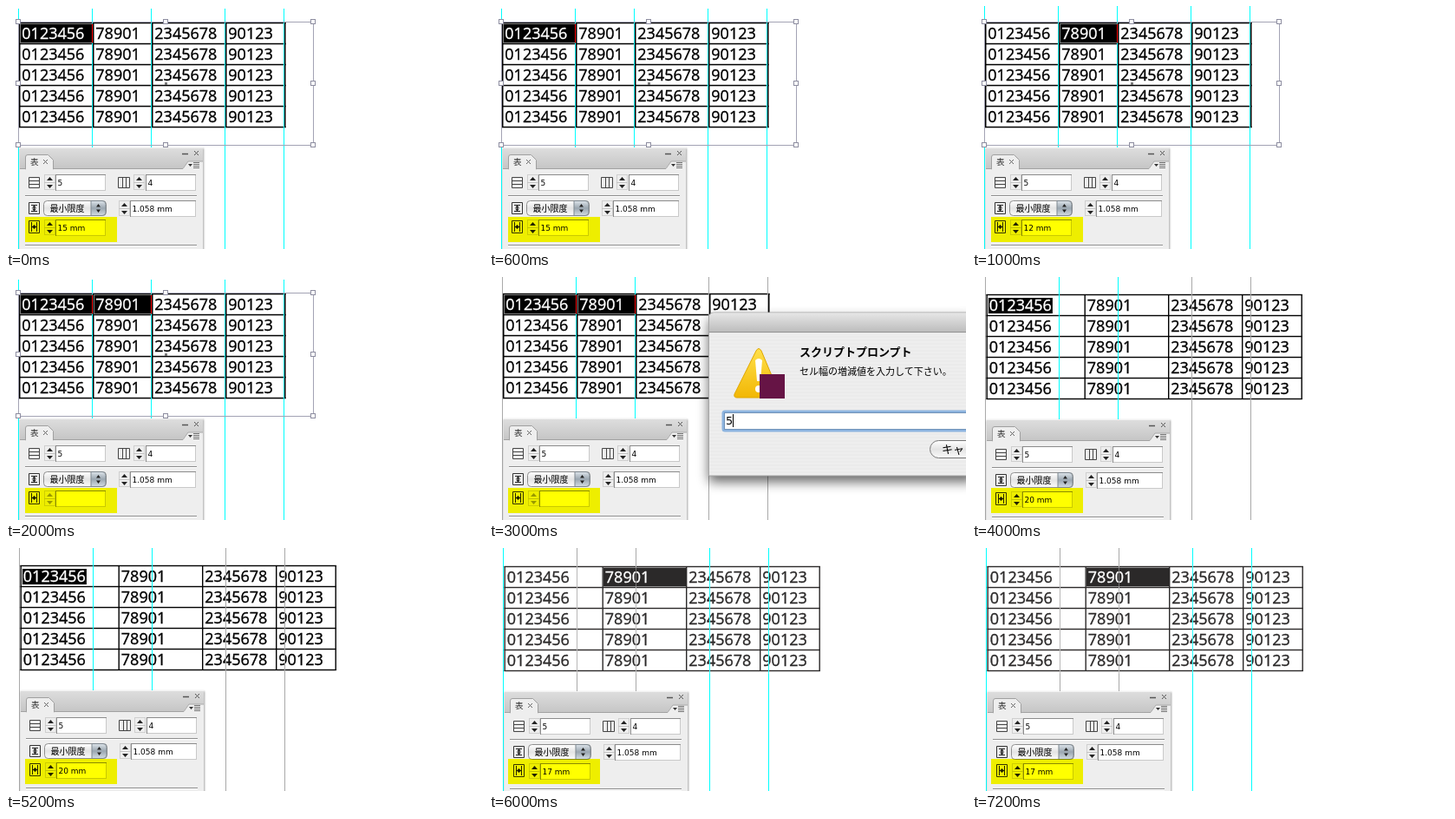
Recreate the animation shown at these times as an HTML page. Size 550 px wide and 280 px high, loop 8 s.

```html
<!DOCTYPE html>
<html lang="ja">
<head>
<meta charset="utf-8">
<title>Table cell width</title>
<style>
html, body { margin: 0; width: 100%; height: 100%; overflow: hidden; background: #fff; }
svg { display: block; width: 550px; height: 280px; }
text { white-space: pre; }
.cell { font: 18px "Open Sans", "Noto Sans", sans-serif; stroke: #000; stroke-width: .35px; }
.ui { font: 9px "DejaVu Sans", sans-serif; }
.jp { font-family: "Noto Sans CJK JP", "Noto Sans CJK", sans-serif; }
.invert { mix-blend-mode: difference; }
.fade { mix-blend-mode: screen; }
.marker { mix-blend-mode: multiply; }
</style>
</head>
<body>
<svg viewBox="0 0 550 280" xmlns="http://www.w3.org/2000/svg">
  <defs>
    <linearGradient id="bar" x2="0" y2="1">
      <stop stop-color="#dedede"/><stop offset="1" stop-color="#c6c6c6"/>
    </linearGradient>
    <linearGradient id="title" x2="0" y2="1">
      <stop stop-color="#e6e6e6"/><stop offset="1" stop-color="#bdbdbd"/>
    </linearGradient>
    <linearGradient id="button" x2="0" y2="1">
      <stop stop-color="#fff"/><stop offset=".5" stop-color="#e4e4e4"/><stop offset="1" stop-color="#fafafa"/>
    </linearGradient>
    <linearGradient id="knob" x2="0" y2="1">
      <stop stop-color="#dde4ea"/><stop offset=".5" stop-color="#9aa6b0"/><stop offset="1" stop-color="#d3dce3"/>
    </linearGradient>
    <linearGradient id="warn" x2="0" y2="1">
      <stop stop-color="#ffe04a"/><stop offset="1" stop-color="#f2b705"/>
    </linearGradient>
    <filter id="soft" x="-20%" y="-20%" width="140%" height="140%"><feGaussianBlur stdDeviation="7"/></filter>
    <filter id="near" x="-5%" y="-5%" width="110%" height="110%"><feGaussianBlur stdDeviation="1"/></filter>
  </defs>
  <g id="stage"></g>
</svg>
<script>
const stage = document.getElementById('stage');
const LABELS = ['0123456', '78901', '2345678', '90123'];
const GUIDES = [14, 99, 167, 252, 320];
const NARROW = [15, 100, 168, 253, 321];
const WIDE = [15.5, 128.5, 225, 310, 378.5];
const ROW = 24, TOP = 19, LOOP = 8000;

// cyan: indices of highlighted guides; sel: selected columns of the first row
const before = { dx: 0, dy: 0, cols: NARROW, cyan: [0, 1, 2, 3, 4], guideTop: 3, frame: true, weight: 1.5 };
const after = { dx: 1, dy: 1, cols: WIDE, cyan: [1, 2], guideTop: -3, weight: 1.4 };
const STEPS = [
  { ...before, until: 1000, sel: [0], width: '15 mm' },
  { ...before, until: 2000, sel: [1], width: '12 mm', guideTop: 0 },
  { ...before, until: 3000, sel: [0, 1], width: '' },
  { ...before, until: 4000, dx: 1, cyan: [1, 2], guideTop: 0, frame: false, sel: [0, 1], width: '', dialog: true },
  { ...after, until: 6000, sel: [0], textOnly: true, width: '20 mm' },
  { ...after, until: LOOP, dx: 2, dy: 2, cyan: [0, 3, 4], sel: [1], faded: true, width: '17 mm' }
];

const rect = (x, y, w, h, fill, more = '') =>
  `<rect x="${x}" y="${y}" width="${w}" height="${h}" fill="${fill}" ${more}/>`;
const box = (x, y, w, h, fill, stroke, more = '') =>
  rect(x + .5, y + .5, w - 1, h - 1, fill, `stroke="${stroke}" ${more}`);
const path = (d, fill, more = '') => `<path d="${d}" fill="${fill}" ${more}/>`;
const line = (d, color = '#222', w = 1) => path(d, 'none', `stroke="${color}" stroke-width="${w}"`);
const text = (x, y, s, cls, more = '') => `<text x="${x}" y="${y}" class="${cls}" ${more}>${s}</text>`;
const move = (x, y, s) => `<g transform="translate(${x} ${y})">${s}</g>`;

function table({ cols, weight }) {
  const left = cols[0], span = cols[4] - left + weight;
  let out = '';
  for (let r = 0; r < 5; r++)
    LABELS.forEach((s, c) => out += text(cols[c] + 3.3, TOP + 19 + r * ROW, s, 'cell'));
  for (let r = 0; r <= 5; r++)
    out += rect(left, TOP + r * ROW - .2, span, weight, '#000');
  for (const x of cols) out += rect(x, TOP, weight, ROW * 5 + 1, '#000');
  return out;
}

function guides({ cyan, guideTop }) {
  return GUIDES.map((x, i) =>
    rect(x, guideTop, 1, 290, cyan.includes(i) ? '#0ff' : '#a9a9a9')).join('');
}

function selection({ cols, sel, textOnly, weight }) {
  return sel.map(c => {
    const x = cols[c] + weight;
    return textOnly
      ? rect(x + 1, TOP + 4, 74, 18, '#fff', 'class="invert"')
      : rect(x, TOP + 1.5, cols[c + 1] - x, ROW - 2, '#fff', 'class="invert"');
  }).join('');
}

function frame() {
  const xs = [14, 184, 354], ys = [18, 89, 160];
  let out = box(14, 18, 341, 143, 'none', '#a3a3b4');
  for (const x of xs) for (const y of ys)
    out += x === 184 && y === 89
      ? rect(x - 1, y - 1, 3, 3, '#777')
      : box(x - 3, y - 3, 6, 6, '#fff', '#8d8da0');
  return out;
}

function stepper(x, y, color = '#222') {
  return box(x, y, 13, 18, 'none', '#cfcfcf') + line(`M${x} ${y + 9.5}h13`, '#c4c4c4') +
    path(`M${x + 3} ${y + 7}h7l-3.5-4zM${x + 3} ${y + 12}h7l-3.5 4z`, color);
}

function field(x, y, w, value) {
  return box(x, y, w, 19, '#fff', '#c9c9c9') +
    line(`M${x} ${y + .5}h${w}M${x + .5} ${y}v19`, '#8b8b8b') +
    text(x + 2.5, y + 12.5, value, 'ui');
}

function rule(y) {
  return rect(22, y, 198, 1, '#8e8e8e') + rect(22, y + 1, 198, 1, '#fff');
}

function icons() {
  const rows = line('M26.5 197.5h12v12h-12zM27 201.5h12M27 205.5h12', '#444');
  const columns = line('M129.5 197.5h13v12h-13zM134.5 198v11M138.5 198v11', '#444');
  const height = line('M26.5 226.5h12v13h-12z', '#333') + line('M29 229.5h7M29 236.5h7M32.5 230v6') +
    path('M30 232.5h5l-2.5-3zM30 233.5h5l-2.5 3z', '#222');
  const width = line('M26.5 247.5h12v14h-12z', '#333') + line('M29.5 249v11M35.5 249v11M29 254.5h7') +
    path('M30 254.5l2.5-2.5v5zM35 254.5l-2.5-2.5v5z', '#222');
  return rows + columns + height + width;
}

function panel({ width, dx, dy }) {
  return rect(16, 164, 212, 130, '#000', 'opacity=".35" filter="url(#near)"') +
    rect(16, 163, 211, 130, '#eee') +
    rect(16, 163, 211, 24, 'url(#bar)') + rect(16, 163, 211, 1, '#f2f2f2') +
    rect(16, 187, 211, 1, '#a2a2a2') +
    path('M22.5 188v-14q0-2.5 2.5-2.5h23.5l6 6v10.5z', '#eee', 'stroke="#a0a0a0"') +
    rect(23, 187, 31, 2, '#eee') +
    text(28, 183, '表', 'jp', 'font-size="9.5" fill="#333"') +
    line('M43 177l5 5m0-5l-5 5', '#666') +
    line('M203 170.5h7', '#555', 1.5) + line('M217 167l5 5m0-5l-5 5', '#555') +
    path('M204 187l6-8h17v9h-23z', '#eee') + line('M204 187.5l6-8.5h17', '#aaa') +
    path('M210 182h5l-2.5 3z', '#333') +
    line('M216 180.5h7M216 182.5h7M216 184.5h7M216 186.5h7', '#555', .8) +
    icons() +
    stepper(44, 194) + field(57, 194, 58, '5') +
    stepper(147, 194) + field(161, 194, 58, '4') +
    rule(218) +
    box(43, 224, 73, 18, 'url(#button)', '#8f8f8f', 'rx="4"') +
    path('M98 224.5h13q4 0 4 4v9q0 4-4 4h-13z', 'url(#knob)', 'stroke="#7f8890"') +
    path('M104 231.5h5l-2.5-3.5zM104 234.5h5l-2.5 3.5z', '#222') +
    text(50.5, 236.5, '最小限度', 'jp', 'font-size="10" font-weight="500"') +
    stepper(130, 224) + field(143, 224, 76, '1.058 mm') +
    stepper(44, 246, width ? '#222' : '#999') + field(57, 246, 58, width) +
    rect(22 - dx, 243 - dy, 106, 29, '#ff0', 'class="marker"') +
    rule(275);
}

function dialog() {
  const shape = 'M253.5 229v-182q0-6 6-6h300v188z';
  let stripes = '';
  for (let y = 65; y < 228; y += 4) stripes += `M254 ${y}h296`;
  return path(shape, '#000', 'opacity=".6" filter="url(#soft)" transform="translate(0 7)"') +
    path(shape, '#eee', 'stroke="#a5a5a5"') + line(stripes, '#ebebeb', 2) +
    path('M254 63v-16q0-5.5 5.5-5.5h300v21.5z', 'url(#title)') + rect(254, 63, 296, 1, '#929292') +
    path('M308 85q3-5 6 0l21 50q1 4-3 4h-46q-4 0-3-4z', 'url(#warn)', 'stroke="#dfa600"') +
    path('M307 96q4-4 8 0l-2 24h-4z', '#fff') + '<circle cx="311" cy="129" r="4" fill="#fff"/>' +
    rect(312, 112, 29, 28, '#661445') +
    text(358, 91, 'スクリプトプロンプト', 'jp', 'font-size="13" font-weight="700"') +
    text(358, 113, 'セル幅の増減値を入力して下さい。', 'jp', 'font-size="11"') +
    rect(270, 155, 290, 22, '#fff', 'stroke="#8db4df" stroke-width="3" rx="2"') +
    box(271, 156, 290, 20, '#fff', '#6f91b8') +
    text(273, 170, '5', '', 'font-family="DejaVu Sans, sans-serif" font-size="13"') +
    rect(281, 158, 1, 15, '#000') +
    rect(508.5, 188.5, 90, 20, 'url(#button)', 'stroke="#777" rx="10"') +
    text(522, 203, 'キャンセル', 'jp', 'font-size="13"');
}

let shown;
function draw(now) {
  const t = now % LOOP;
  const step = STEPS.find(s => t < s.until);
  if (step === shown) return;
  shown = step;
  stage.innerHTML = rect(0, 0, 550, 280, '#fff') +
    move(step.dx, step.dy,
      table(step) + guides(step) + selection(step) +
      (step.faded ? rect(15, 18, 366, 125, '#2b2929', 'class="fade"') : '') +
      (step.frame ? frame() : '') + panel(step)) +
    (step.dialog ? dialog() : '');
}

const start = performance.now();
function tick() {
  draw(performance.now() - start);
  requestAnimationFrame(tick);
}
tick();
</script>
</body>
</html>
```
